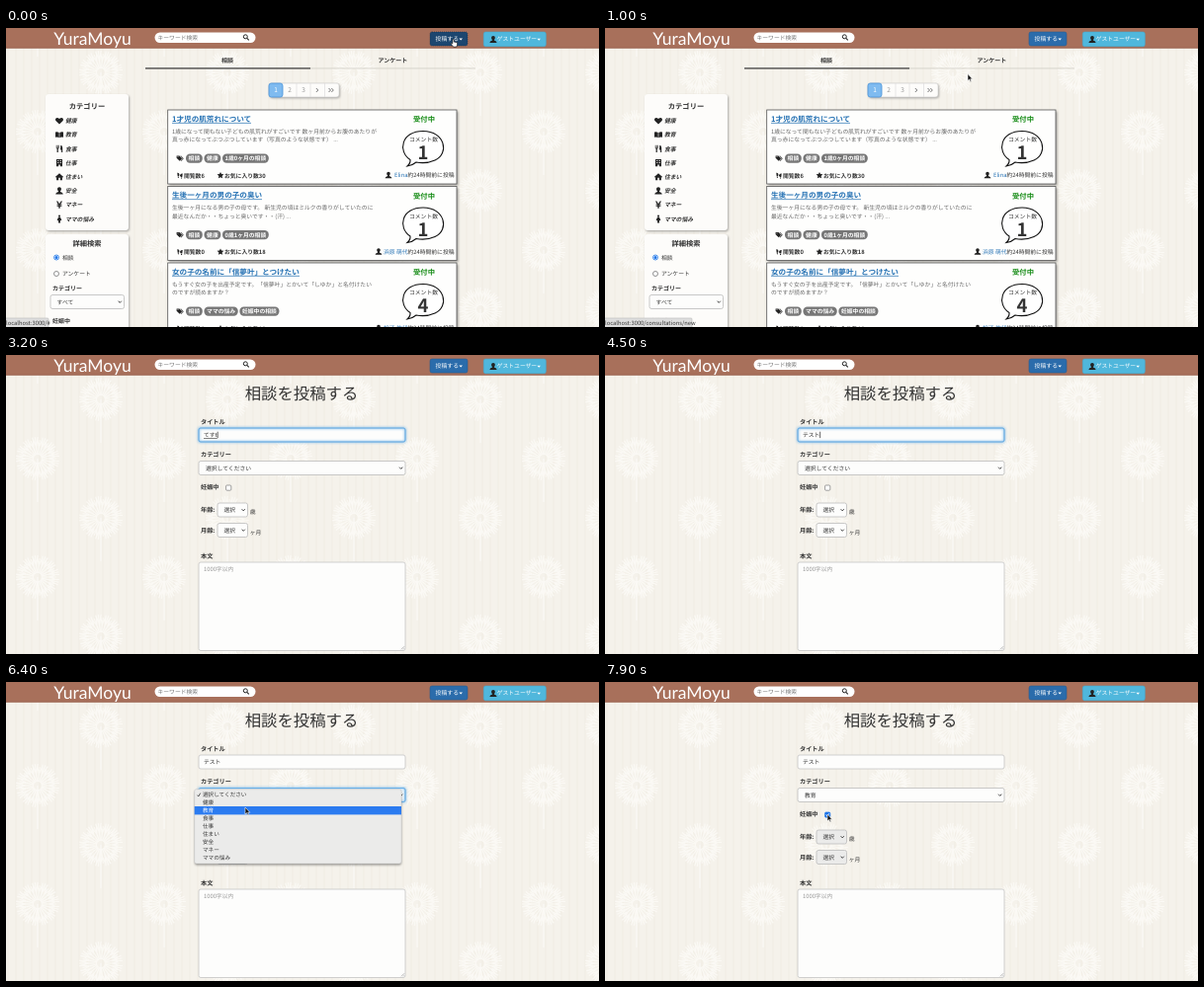
Recreate the animation shown at these times as an HTML page. Size 600 by 303 pixels, loop 8000 ms.

```html
<!DOCTYPE html>
<html lang="ja">
<head>
<meta charset="utf-8">
<title>相談を投稿する</title>
<style>
html, body { margin: 0; width: 100%; height: 100%; overflow: hidden; background: #f4f1ea; }
svg { display: block; width: 100%; height: 100%; }
text { font-family: "Noto Sans CJK JP", "Noto Sans CJK", "Noto Sans", sans-serif; text-rendering: geometricPrecision; white-space: pre; }
.logo { font-family: Lato, sans-serif; }
</style>
</head>
<body>
<svg id="stage" viewBox="0 0 600 303" preserveAspectRatio="none"></svg>
<script>
const LOOP = 8000, STEP = 100;
const INK = '#333', GREY = '#666', HINT = '#999', LINK = '#2672b4';
const stage = document.getElementById('stage');
const $ = id => document.getElementById(id);

const attrs = o => Object.entries(o).map(([k, v]) => ` ${k}="${v}"`).join('');
const text = (x, y, size, str, o = {}) =>
  `<text${attrs({ x, y: y + size * 0.37, 'font-size': size, fill: INK, ...o })}>${str}</text>`;
const bold = (x, y, size, str, o = {}) => text(x, y, size, str, { 'font-weight': 700, ...o });
const rect = (x, y, width, height, fill, o = {}) => `<rect${attrs({ x, y, width, height, fill, ...o })}/>`;
const path = (d, o = {}) => `<path${attrs({ d, fill: '#222', ...o })}/>`;
const line = (d, color, width = 1, o = {}) =>
  path(d, { fill: 'none', stroke: color, 'stroke-width': width, ...o });
const group = (id, body, o = {}) => `<g${attrs({ id, ...o })}>${body}</g>`;
const mid = { 'text-anchor': 'middle' };

// Icons are centred on the origin, about 8 units wide
const icons = {
  heart: 'M0 3.6L-3.6 0C-5-2-2.5-4.6 0-2C2.5-4.6 5-2 3.6 0Z',
  book: 'M-4-2.8Q-2-3.4-.3-2.3V3Q-2 2-4 2.6ZM4-2.8Q2-3.4 .3-2.3V3Q2 2 4 2.6Z',
  fork: 'M-3.2-3.6H-2.6V-1H-2.1V-3.6H-1.5V-1H-1V-3.6H-.4V-.6L-1.2 .2V3.7H-2.4V.2L-3.2-.6ZM1.3-3.6Q3.2-3.4 3.2-1V3.7H2.1V1H1Z',
  office: 'M-3-3.7H3V3.7H.8V2H-.8V3.7H-3ZM-1.8-2.6V-1.5H-.7V-2.6ZM.7-2.6V-1.5H1.8V-2.6ZM-1.8-.6V.5H-.7V-.6ZM.7-.6V.5H1.8V-.6Z',
  house: 'M0-3.6L4.2 .1L3.6 .7L2.9 .2V3.4H.8V1H-.8V3.4H-2.9V.2L-3.6 .7L-4.2 .1Z',
  person: 'M0-3.7C2.6-3.7 2.2-.4 1 .3V1Q3.8 1.7 3.8 3.6H-3.8Q-3.8 1.7-1 1V.3C-2.2-.4-2.6-3.7 0-3.7Z',
  yen: 'M-3-3.6H-1.6L0-.9L1.6-3.6H3L1.3-.7H2.4V.2H.7V1H2.4V1.9H.7V3.6H-.7V1.9H-2.4V1H-.7V.2H-2.4V-.7H-1.3Z',
  mother: 'M0-4A1 1 0 0 1 0-2A1 1 0 0 1 0-4ZM-1-1.7H1L2.4 1.7H1V4H-1V1.7H-2.4Z',
  tag: 'M-4-3H-.6L2.6 .3L-.3 3.2L-4-.4ZM-2.8-2.1V-1.2H-1.9V-2.1ZM.5-3H1.3L4.4 .3L1.3 3.4L.8 2.9L3.3 .3Z',
  feet: 'M-3.4-3.4Q-.9-4-.7-1.2L-1.2 1H-2.9ZM-2.8 1.6H-1.2Q-1 3-2 3Q-3 3-2.8 1.6ZM3.4-2.4Q.9-3-.1 0L1.2 2H2.9ZM1.2 2.6H2.8Q3 4 2 4Q1 4 1.2 2.6Z',
  star: 'M0-4L1.2-1.4L4-1.1L1.9 .8L2.5 3.6L0 2.2L-2.5 3.6L-1.9 .8L-4-1.1L-1.2-1.4Z'
};
const icon = (name, x, y, k = 1) =>
  path(icons[name], { transform: `translate(${x} ${y}) scale(${k})`, 'fill-rule': 'evenodd' });
const caretDown = (x, y) => path(`M${x} ${y}h3.6l-1.8 2z`, { fill: '#fff' });
const chevron = (x, y) => line(`M${x - 1.6} ${y - .8}l1.6 1.7l1.6-1.7`, INK, .9);

function tree(x, y) {
  let d = `M${x} ${y}V${y + 44}`;
  for (let i = 0; i < 26; i++) {
    const a = i / 26 * Math.PI * 2, r = 19 + 3 * (i % 2), c = Math.cos(a), s = Math.sin(a);
    d += `M${x + 4 * c} ${y + 4 * s}L${x + r * c} ${y + r * s}`;
    for (const b of [a - .13, a + .13])
      d += `M${x + 12 * c} ${y + 12 * s}L${x + r * Math.cos(b)} ${y + r * Math.sin(b)}`;
  }
  return line(d, '#fcfbf8', 1.1, { opacity: .8 });
}

function backdrop() {
  let lines = '';
  for (let x = 2; x < 128; x += 8) lines += `M${x} 0V120`;
  const tile = line(lines, '#f1ede4', 1.2) + tree(96, 45) + tree(32, 105) + tree(32, -15);
  return `<defs><pattern id="trees" width="128" height="120" patternUnits="userSpaceOnUse">${tile}</pattern>
    <filter id="soft" x="-20%" y="-20%" width="140%" height="140%"><feGaussianBlur stdDeviation="1.3"/></filter></defs>`
    + rect(0, 0, 600, 303, '#f5f2eb') + rect(0, 0, 600, 303, 'url(#trees)');
}

function header() {
  return rect(0, 0, 600, 20.5, '#a8705b') + rect(0, 19.7, 600, .8, '#98624f')
    + text(87.5, 11, 17.5, 'YuraMoyu', { fill: '#fff', class: 'logo', ...mid })
    + rect(150.5, 4.5, 102, 10.5, '#fff', { rx: 5.2 })
    + text(153.5, 9.7, 5.8, 'キーワード検索', { fill: '#777' })
    + '<circle cx="242.3" cy="8.8" r="2" fill="none" stroke="#222"/>' + line('M243.8 10.3l2 2', '#222', 1.1)
    + rect(429, 4, 38, 14, '#2b6cab', { rx: 2, id: 'post', stroke: '#245c93', 'stroke-width': .6 })
    + text(434.5, 11, 5.9, '投稿する', { fill: '#fff' }) + caretDown(458.4, 10.6)
    + rect(483.3, 4, 63, 14.7, '#50b7dc', { rx: 2, stroke: '#43a8ce', 'stroke-width': .6 })
    + icon('person', 493, 11.6, .95) + text(496.7, 11.2, 5.8, 'ゲストユーザー', { fill: '#fff' }) + caretDown(537.4, 10.8);
}

function panel(x, y, w, h) {
  return rect(x + 1, y + 1.3, w, h, '#777', { rx: 3, opacity: .6, filter: 'url(#soft)' })
    + rect(x, y, w, h, '#fdfcfa', { rx: 3 });
}

function select(x, y, w, label, o = {}) {
  return rect(x, y, w, 14, '#fdfdfc', { rx: 2, stroke: '#bbb', 'stroke-width': .8, ...o })
    + chevron(x + w - 4.3, y + 7);
}

function sidebar() {
  const items = [['heart', '健康'], ['book', '教育'], ['fork', '食事'], ['office', '仕事'],
    ['house', '住まい'], ['person', '安全'], ['yen', 'マネー'], ['mother', 'ママの悩み']];
  const radio = (y, on) => `<circle cx="51" cy="${y}" r="2.5" fill="#fff" stroke="${on ? '#1a73e8' : '#777'}" stroke-width=".8"/>`
    + (on ? `<circle cx="51" cy="${y}" r="1.5" fill="#1a73e8"/>` : '');
  return panel(40, 67, 84, 138) + bold(82, 79, 7.3, 'カテゴリー', mid)
    + items.map(([name, label], i) => icon(name, 54, 94 + i * 14.2)
      + bold(60, 94 + i * 14.2, 5.8, label, { 'font-style': 'italic' })).join('')
    + panel(40, 209, 84, 110) + bold(82, 218.5, 7.3, '詳細検索', mid)
    + radio(232.5, true) + bold(57, 232.5, 5.8, '相談', { 'font-weight': 500 })
    + radio(249, false) + bold(57, 249, 5.8, 'アンケート', { 'font-weight': 500 })
    + bold(47, 264, 6, 'カテゴリー')
    + select(45, 270.5, 74.5) + text(51.5, 277.5, 5.8, 'すべて') + bold(47, 297, 6, '妊娠中');
}

function pager() {
  return panel(266, 56, 71, 14)
    + rect(266, 56, 71, 14, 'none', { rx: 2, stroke: '#ccc', 'stroke-width': .6 })
    + line('M294 56v14M308 56v14M322.5 56v14', '#ddd', .7)
    + rect(266, 56, 14, 14, '#7fbbf0', { rx: 2.5, stroke: '#4a93d8', 'stroke-width': .8 })
    + text(273, 63, 6.5, '1', { fill: '#fff', ...mid })
    + text(287, 63, 6.5, '2', { fill: HINT, ...mid }) + text(301, 63, 6.5, '3', { fill: HINT, ...mid })
    + line('M313.8 61l2 2l-2 2M326.5 61l2 2l-2 2M329.3 61l2 2l-2 2', '#777', 1);
}

function card(y, c) {
  let x = 182, tags = '';
  for (const t of c.tags) {
    const w = [...t].reduce((s, ch) => s + (ch < 'z' ? 3.4 : 5.8), 5.2);
    tags += rect(x, y + 44.4, w, 9.4, '#777', { rx: 4.2 }) + bold(x + w / 2, y + 49, 5.8, t, { fill: '#fff', ...mid });
    x += w + 1.7;
  }
  const name = `<tspan fill="${LINK}">${c.by}</tspan>約24時間前に投稿`;
  return rect(165, y + 1.5, 292.5, 75, '#555', { opacity: .55, filter: 'url(#soft)' })
    + rect(163.7, y, 292.3, 75, '#fefefd', { stroke: '#555', 'stroke-width': .8 })
    + bold(168, y + 8.8, 7.6, c.title, { fill: LINK }) + rect(168, y + 12.9, c.w, .7, LINK)
    + c.body.map((s, i) => text(168, y + 21.5 + i * 8.5, 5.8, s, { fill: GREY })).join('')
    + icon('tag', 176, y + 49, .85) + tags
    + icon('feet', 176, y + 66.5, .8) + bold(180, y + 66.5, 5.8, '閲覧数' + c.views)
    + icon('star', 217, y + 66.3, .85) + bold(221, y + 66.5, 5.8, 'お気に入り数' + c.likes)
    + bold(423, y + 9.7, 7.3, '受付中', { fill: '#138a13', ...mid })
    + path(`M409 ${y + 50.5}C396 ${y + 42} 400 ${y + 21.5} 422 ${y + 21.5}S449 ${y + 44} 434 ${y + 51}Q425 ${y + 55} 415 ${y + 53}Q411 ${y + 56.5} 406 ${y + 57}Q409.5 ${y + 54} 409 ${y + 50.5}Z`,
      { fill: '#fff', stroke: '#111', 'stroke-width': 1.1 })
    + text(422.5, y + 30, 5.8, 'コメント数', mid) + bold(422, y + 43.5, 18.5, c.count, mid)
    + icon('person', c.iconX, y + 66, .9) + text(453.5, y + 66, 5.8, name, { 'text-anchor': 'end' });
}

const cards = [
  { title: '1才児の肌荒れについて', w: 80, count: 1, by: 'Elina', iconX: 387, views: 6, likes: 30,
    body: ['1歳になって間もない子どもの肌荒れがすごいです 数ヶ月前からお腹のあたりが', '真っ赤になってぶつぶつしています（写真のような状態です） ...'],
    tags: ['相談', '健康', '1歳0ヶ月の相談'] },
  { title: '生後一ヶ月の男の子の臭い', w: 91, count: 1, by: '浜原 萌代', iconX: 377, views: 0, likes: 18,
    body: ['生後一ヶ月になる男の子の母です。 新生児の頃はミルクの香りがしていたのに', '最近なんだか・・ちょっと臭いです・・(汗) ...'],
    tags: ['相談', '健康', '0歳1ヶ月の相談'] },
  { title: '女の子の名前に「信夢叶」とつけたい', w: 129, count: 4, by: '松江 佐代', iconX: 377, views: 0, likes: 10,
    body: ['もうすぐ女の子を出産予定です。「信夢叶」とかいて「しゆか」と名付けたい', 'のですが読めますか？'],
    tags: ['相談', 'ママの悩み', '妊娠中の相談'] }
];

function listPage() {
  return bold(224, 33, 6, '相談', mid) + bold(391.5, 33, 6, 'アンケート', mid)
    + rect(141, 40.3, 167, 1.2, '#333') + rect(308, 40.6, 167, .7, '#c9c5be')
    + pager() + sidebar() + cards.map((c, i) => card(83 + i * 77.5, c)).join('')
    + group('postMenu', panel(429, 20, 87, 28) + text(440, 28.5, 6, '相談') + text(440, 39.5, 6, 'アンケート'))
    + rect(-1, 294, 44, 10, '#dedede', { id: 'statusBox', rx: 1, stroke: '#bbb', 'stroke-width': .6 })
    + text(0, 299, 5.8, '', { id: 'status' });
}

function formPage() {
  const field = { rx: 2, stroke: '#c4c4c4', 'stroke-width': .8 };
  const glow = (id, y) => group(id, rect(195, y, 209, 14, 'none', { rx: 2, stroke: '#66afe9', 'stroke-width': 2.6, opacity: .55, filter: 'url(#soft)' })
    + rect(195, y, 209, 14, 'none', { rx: 2, stroke: '#66afe9', 'stroke-width': 1 }));
  return text(299, 38.5, 16.4, '相談を投稿する', mid)
    + bold(197, 67.5, 6.2, 'タイトル') + rect(195, 74, 209, 14, '#fdfdfc', field) + glow('titleGlow', 74)
    + text(200, 81, 5.8, '', { id: 'title' }) + rect(200, 77.7, .7, 6.4, '#222', { id: 'caret' })
    + rect(200, 84.2, 0, .6, '#333', { id: 'compose' })
    + bold(197, 101, 6.2, 'カテゴリー') + select(195, 107.5, 209) + glow('catGlow', 107.5)
    + text(202, 114.5, 5.8, '', { id: 'category' })
    + bold(197, 134, 6.2, '妊娠中') + rect(222.6, 132, 5.2, 5.2, '#fff', { id: 'box', rx: 1, stroke: '#777', 'stroke-width': .7 })
    + line('M223.7 134.6l1.2 1.3l2-2.7', '#fff', .9, { id: 'tick' })
    + bold(197, 156.5, 6.2, '年齢:') + select(214, 150, 30.5, '', { id: 'age' }) + text(220.5, 157, 5.8, '選択')
    + text(246.7, 159.3, 5.8, '歳')
    + bold(197, 177.5, 6.2, '月齢:') + select(214, 170.5, 30.5, '', { id: 'month' }) + text(220.5, 177.5, 5.8, '選択')
    + text(246.7, 180, 5.8, 'ヶ月')
    + bold(197, 204, 6.2, '本文') + rect(195, 210, 209, 89.5, '#fdfdfc', field)
    + text(200, 217, 5.8, '1000字以内', { fill: HINT }) + line('M400 298.3l3-3M402 298.3l1-1', '#888', .6)
    + group('options', optionList());
}

const options = ['選択してください', '健康', '教育', '食事', '仕事', '住まい', '安全', 'マネー', 'ママの悩み'];
function optionList() {
  return rect(191, 110, 209, 75.5, '#000', { rx: 2, opacity: .4, filter: 'url(#soft)' })
    + rect(190.7, 108.7, 209.3, 75.3, '#ebebea', { rx: 2, stroke: '#c4c4c4', 'stroke-width': .5 })
    + rect(190.7, 110, 209.3, 8.4, '#2b7bf0', { id: 'row' })
    + options.map((s, i) => text(199, 114.3 + i * 8, 5.6, s, { id: 'opt' + i })).join('')
    + line('M193.6 114.6l1.1 1.4l2-3.4', INK, .8, { id: 'mark' });
}

function pointer() {
  const edge = { stroke: '#fff', 'stroke-width': .6 };
  return group('arrow', path('M0 0V7L1.6 5.6L2.7 8L3.8 7.5L2.7 5.2H4.8Z', { ...edge, fill: '#111' }))
    + group('hand', path('M0 0Q1 -.6 1.3 .4V2.6L4.6 3.2Q5 6 3.8 7.6H.6Q-.8 5.8-1.9 4.2Q-1.4 3.4-.2 4.4Z', { fill: '#fff', stroke: '#111', 'stroke-width': .6 }))
    + group('beam', line('M-1.4-3.2Q0-3.2 0-2.4Q0-3.2 1.4-3.2M0-2.4V2.4M-1.4 3.2Q0 3.2 0 2.4Q0 3.2 1.4 3.2', '#222', .8));
}

stage.innerHTML = backdrop() + header() + group('list', listPage()) + group('form', formPage()) + group('mouse', pointer());

const moves = [[0, 452, 11.5], [300, 452, 12], [600, 447, 28], [700, 446, 28], [900, 368, 46], [1100, 366, 47],
  [1600, 298, 75], [4700, 298, 75], [5100, 288, 146], [5500, 276, 110.5], [5800, 276, 110.5],
  [6500, 240, 128], [6700, 240, 128], [6900, 237, 134.5], [7300, 225, 134], [LOOP, 225, 134]];
const typing = [[2500, 't'], [2700, 'て'], [2900, 'てs'], [3000, 'てす'], [3200, 'てすt'], [3400, 'てすと'], [3800, 'テスト']];

function mouseAt(t) {
  const i = moves.findIndex(m => m[0] > t);
  const [t0, x0, y0] = moves[i - 1], [t1, x1, y1] = moves[i];
  const u = (t - t0) / (t1 - t0), k = u * u * (3 - 2 * u);
  return [x0 + (x1 - x0) * k, y0 + (y1 - y0) * k];
}
const show = (id, on) => $(id).setAttribute('display', on ? 'inline' : 'none');
const set = (id, o) => { for (const k in o) $(id).setAttribute(k, o[k]); };
const within = (t, a, b) => t >= a && t < b;

function drawList(t, x, y) {
  const pressed = t < 800;
  set('post', { fill: pressed ? '#1c466f' : '#2b6cab', stroke: pressed ? '#102b47' : '#245c93', 'stroke-dasharray': pressed ? '1 1' : 'none' });
  show('postMenu', within(t, 300, 800));
  const far = t >= 500;
  $('status').textContent = far ? 'localhost:3000/consultations/new' : 'localhost:3000/#';
  set('statusBox', { width: far ? 89 : 44 });
}

function drawForm(t, y) {
  const typed = typing.filter(k => k[0] <= t).pop();
  const focus = within(t, 1600, 5600);
  $('title').textContent = typed ? typed[1] : '50字以内';
  set('title', { fill: typed ? INK : HINT });
  const width = typed ? $('title').getComputedTextLength() : 0;
  show('titleGlow', focus);
  show('caret', focus && (within(t, 2500, 5000) || (t - 1600) % 1000 < 500));
  set('caret', { x: 200 + width });
  show('compose', within(t, 2500, 4200));
  set('compose', { width });

  show('catGlow', within(t, 5600, 7600));
  $('category').textContent = t < 7000 ? options[0] : options[2];
  show('options', within(t, 5600, 7000));
  set('options', { opacity: t < 6800 ? 1 : t < 6900 ? .6 : .2 });
  const active = t >= 6500 ? 2 : Math.max(0, Math.floor((y - 110) / 8));
  const lit = t !== 6600;
  show('row', lit);
  set('row', { y: 110 + active * 8 });
  options.forEach((s, i) => set('opt' + i, { fill: lit && i === active ? '#fff' : INK }));
  set('mark', { stroke: active === 0 ? '#fff' : INK });

  const checked = t >= 7600;
  set('box', { fill: checked ? '#1a73e8' : '#fff', stroke: checked ? '#1a73e8' : '#777' });
  show('tick', checked);
  for (const id of ['age', 'month']) set(id, { fill: checked ? '#ebebea' : '#fdfdfc' });
}

function draw(t) {
  const [x, y] = mouseAt(t), onList = t < 1200;
  show('list', onList);
  show('form', !onList);
  drawList(t, x, y);
  if (!onList) drawForm(t, y);
  const beam = within(t, 1500, 4900), hand = t < 800;
  show('mouse', !within(t, 2500, 4700));
  show('beam', beam);
  show('hand', hand);
  show('arrow', !beam && !hand);
  set('mouse', { transform: `translate(${x} ${y})` });
}

const start = performance.now();
function tick(now) {
  draw(Math.floor(Math.max(0, now - start) % LOOP / STEP) * STEP);
  requestAnimationFrame(tick);
}
draw(0);
requestAnimationFrame(tick);
</script>
</body>
</html>
```
